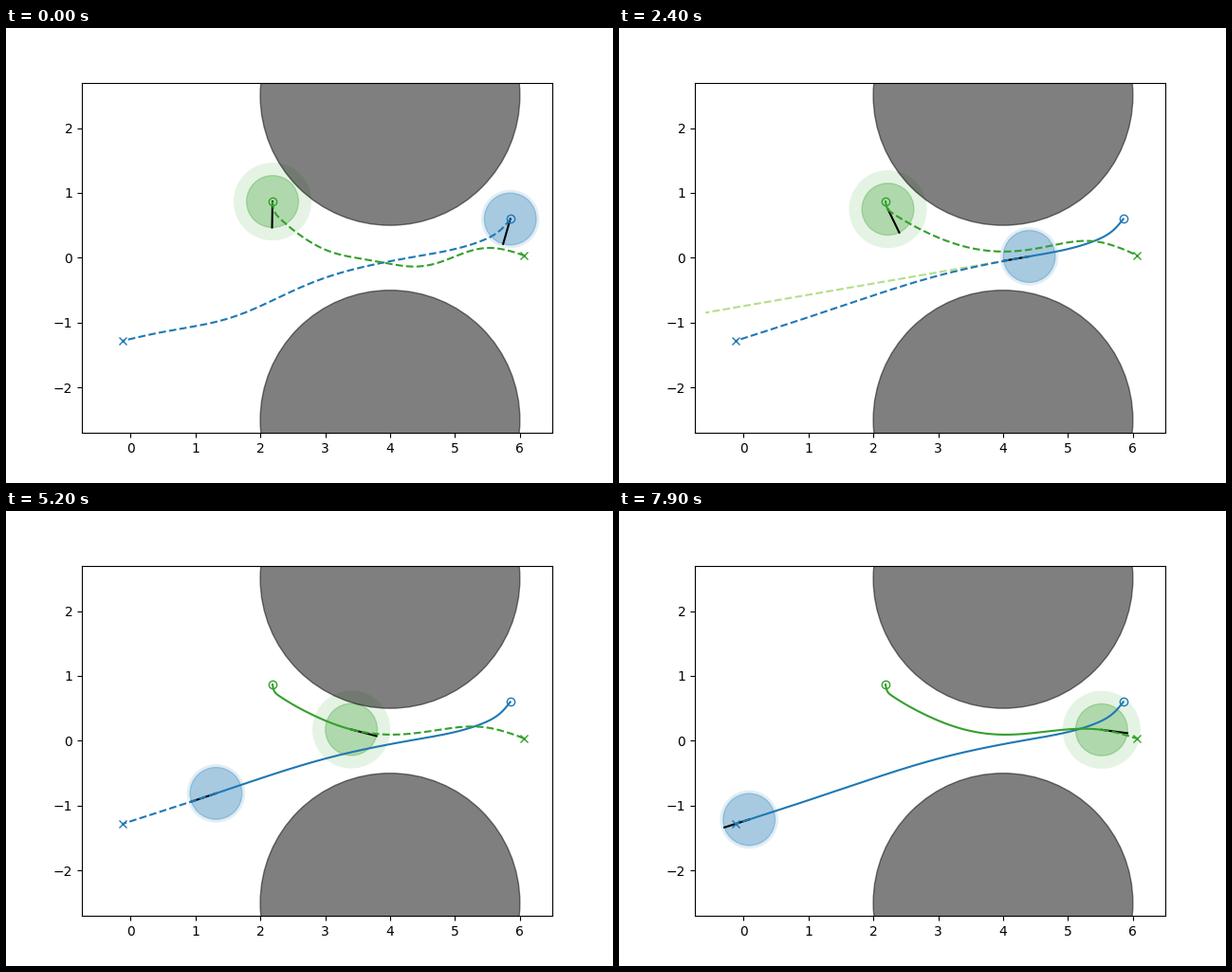
Animation, 640 px wide and 480 px high, one loop 8 s. Source, as a matplotlib script:

```python
import numpy as np
import matplotlib.pyplot as plt
from matplotlib.animation import FuncAnimation
from matplotlib.patches import Circle

FRAMES, STEP = 80, 100      # ms per step
RADIUS = 0.4
PASSED = 3.95               # the robots stop predicting each other
BLUE, GREEN = "#1f78b4", "#33a02c"
LIGHT_BLUE, LIGHT_GREEN = "#a6cee3", "#b2df8a"


def ramp(t, start, end):
    u = np.clip((t - start) / (end - start), 0, 1)
    return u * u * (3 - 2 * u)


def natural_spline(points, samples=1200):
    p = np.array(points, float)
    d = np.r_[0, np.cumsum(np.hypot(*np.diff(p, axis=0).T))]
    h = np.diff(d)
    slope = np.diff(p, axis=0) / h[:, None]
    a, rhs = np.eye(len(p)), np.zeros_like(p)
    for i in range(1, len(p) - 1):
        a[i, i - 1:i + 2] = h[i - 1], 2 * (h[i - 1] + h[i]), h[i]
        rhs[i] = 6 * (slope[i] - slope[i - 1])
    m = np.linalg.solve(a, rhs)
    u = np.linspace(0, d[-1], samples)
    i = np.clip(np.searchsorted(d, u, side="right") - 1, 0, len(h) - 1)
    v, k = (u - d[i])[:, None], h[i][:, None]
    bend = m[i] / 2 * v ** 2 + (m[i + 1] - m[i]) / (6 * k) * v ** 3
    return p[i] + v * (slope[i] - k * (2 * m[i] + m[i + 1]) / 6) + bend


class Robot:
    def __init__(self, ax, points, detours, creep, start, pace, heading, turn,
                 forecast_start, margin, color, light):
        self.x, self.y = natural_spline(points).T
        self.s = np.r_[0, np.cumsum(np.hypot(np.diff(self.x), np.diff(self.y)))]
        self.length = self.s[-1]
        self.detours = detours
        self.creep, self.start, self.pace = creep, start, pace
        self.heading, self.turn = heading, turn
        self.forecast_start = forecast_start
        self.outer = ax.add_patch(
            Circle((0, 0), RADIUS + margin, color=color, alpha=0.125, lw=0))
        self.body = ax.add_patch(
            Circle((0, 0), RADIUS, color=color, alpha=0.3))
        self.forecast, = ax.plot([], [], "--", color=light)
        self.nose, = ax.plot([], [], "k-", zorder=2.1)
        self.trail, = ax.plot([], [], "-", color=color, zorder=2.2)
        self.plan, = ax.plot([], [], "--", color=color, zorder=2.2)
        for end, marker in ((0, "o"), (-1, "x")):
            ax.plot(self.x[end], self.y[end], marker, color=color, mfc="none",
                    zorder=2.3)

    def at(self, s):
        return np.array([np.interp(s, self.s, self.x),
                         np.interp(s, self.s, self.y)])

    def travelled(self, t):
        run = 1 - np.exp(-(max(t - self.start, 0) / self.pace) ** 2.05)
        return (self.creep * ramp(t, 0, 0.8)
                + (self.length - self.creep) * run)

    def tangent(self, s):
        dx, dy = self.at(s + 0.02) - self.at(s - 0.02)
        return np.arctan2(dy, dx)

    def prediction(self, t):
        s = self.travelled(t)
        begin = self.forecast_start
        reach = (self.length - s + 0.35) * ramp(t, begin, begin + 1.15)
        a, p = self.tangent(s), self.at(s)
        return np.array([p, p + reach * np.array([np.cos(a), np.sin(a)])]).T

    def planned(self, t):
        u = np.linspace(0, 1, 200)
        s = self.travelled(t)
        x, y = self.at(s + (self.length - s) * u)
        pinned = 1 - (2 * u - 1) ** 20      # both ends stay on the path
        bump = sum(size * (1 - ramp(t, *fade)) * np.exp(-((x - c) / w) ** 2)
                   for size, c, w, fade in self.detours)
        return x, y + bump * pinned

    def draw(self, t, other, show_plan=True):
        s = self.travelled(t)
        p = self.at(s)
        self.outer.center = self.body.center = tuple(p)
        lag = np.radians(self.heading) - self.tangent(s)
        lag = (lag + np.pi) % (2 * np.pi) - np.pi
        a = self.tangent(s) + lag * (1 - ramp(t, 0, self.turn))
        tip = p + RADIUS * np.array([np.cos(a), np.sin(a)])
        self.nose.set_data(*np.array([p, tip]).T)
        past = self.s < s
        self.trail.set_data(np.r_[self.x[past], p[0]],
                            np.r_[self.y[past], p[1]])
        self.plan.set_data(*(self.planned(t) if show_plan else ([], [])))
        seen = other.forecast_start < t < PASSED
        self.forecast.set_data(*(other.prediction(t) if seen else ([], [])))


fig, ax = plt.subplots(figsize=(6.4, 4.8), dpi=100)
ax.set(xlim=(-0.748, 6.499), ylim=(-2.7, 2.7),
       xticks=range(7), yticks=range(-2, 3))

# detours: (size, centre x, width, (fade start, fade end))
blue = Robot(
    ax,
    [(5.852, .598), (5.695, .422), (5.374, .247), (4.417, .023),
     (3.044, -.264), (1.356, -.798), (-.12, -1.28)],
    [(-.19, 1.6, 1.05, (0, 1.4))],
    creep=0, start=0, pace=4.37, heading=-106, turn=1.5, forecast_start=1.2,
    margin=0.05, color=BLUE, light=LIGHT_BLUE)
green = Robot(
    ax,
    [(2.189, .867), (2.225, .75), (2.3, .685), (2.729, .437), (3.431, .167),
     (4.03, .094), (5.535, .167), (6.065, .035)],
    [(-.27, 4.6, .85, (0, 1.4)), (-.18, 2.95, .75, (0, 1.4)),
     (.075, 5.3, .65, (3.5, 6.7))],
    creep=0.125, start=2.9, pace=3.6, heading=-91, turn=3.6,
    forecast_start=3.15, margin=0.2, color=GREEN, light=LIGHT_GREEN)
for y in (-2.5, 2.5):
    ax.add_patch(Circle((4, y), 2, color="k", alpha=0.5))


def update(i):
    t = i * STEP / 1000
    blue.draw(t, green)
    green.draw(t, blue, show_plan=not 0.95 < t < 2.05)
    return []


anim = FuncAnimation(fig, update, frames=FRAMES, interval=STEP,
                     init_func=lambda: [], repeat=True, repeat_delay=0)
plt.show()
```
